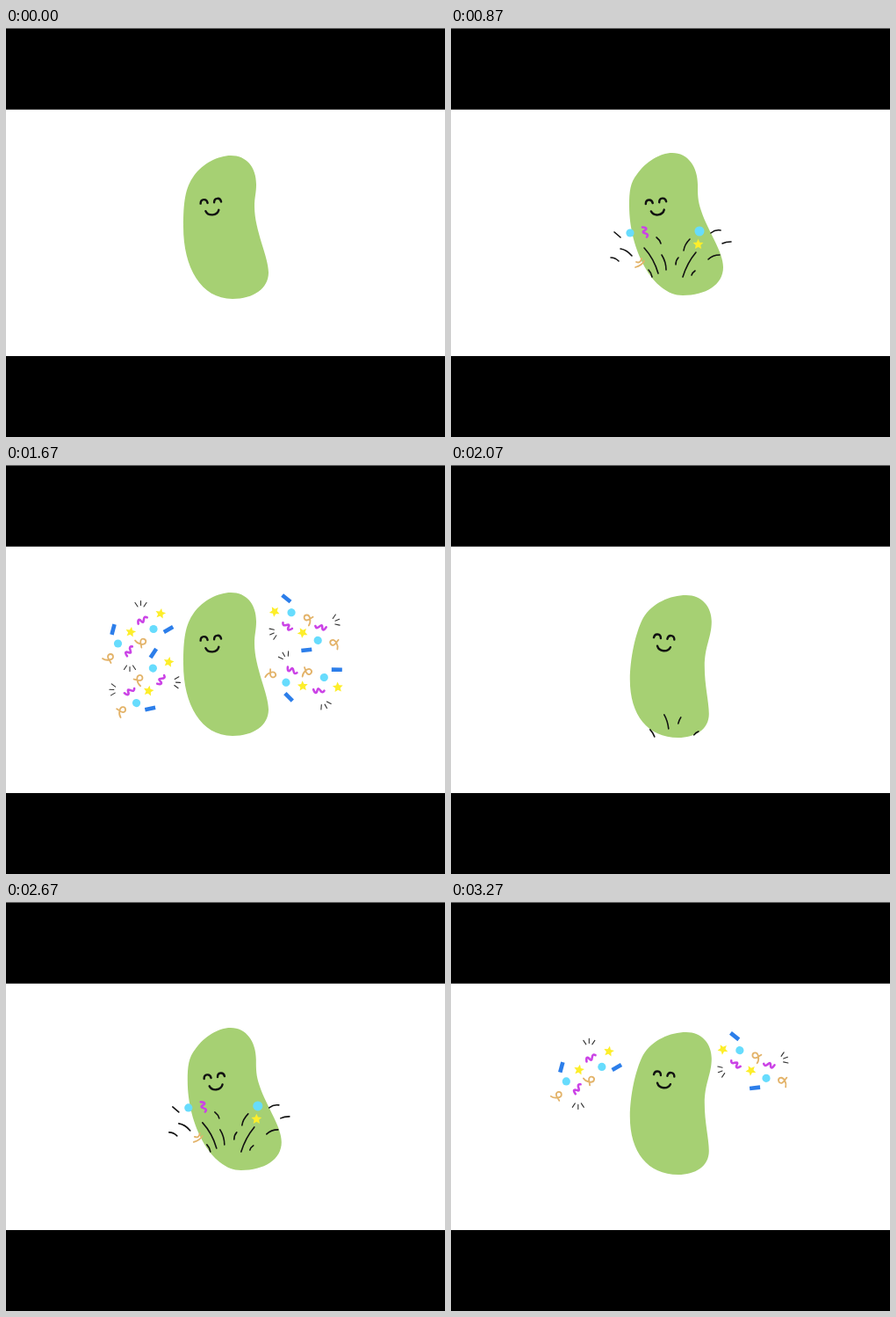
Recreate the animation shown at these times as an HTML page. Size 500 by 465 pixels, loop 3470 ms.

```html
<!DOCTYPE html>
<html lang="en">
<head>
<meta charset="utf-8">
<title>Party bean</title>
<style>
  html, body { margin: 0; width: 100%; height: 100%; overflow: hidden; background: #000; }
  svg { display: block; width: 100vw; height: 100vh; }
  .ink, .squig, .loop, .tick { fill: none; stroke: #111; stroke-linecap: round; stroke-linejoin: round; }
  .ink { stroke-width: 1.6; }
  .face { stroke-width: 2.4; }
  .tick { stroke: #333; stroke-width: 1.1; }
  .squig { stroke: #cb43e6; stroke-width: 2.6; }
  .loop { stroke: #e3b369; stroke-width: 1.8; }
  .dot { fill: #67dcfd; }
  .star { fill: #fdee2a; }
  .bar { fill: #2c7eea; }
  .bean { fill: #a6d073; }
</style>
</head>
<body>
<svg viewBox="0 0 500 465" preserveAspectRatio="none">
  <rect width="500" height="465"/>
  <rect width="500" height="1" fill="#666"/>
  <rect y="92" width="500" height="1" fill="#444"/>
  <rect y="93" width="500" height="280" fill="#fff"/>
  <g id="scene"></g>
</svg>
<script>
const scene = document.getElementById('scene');

const path = (cls, d) => `<path class="${cls}" d="${d}"/>`;
const at = (x, y, turn, body, scale = '1') =>
  `<g transform="translate(${x} ${y}) rotate(${turn}) scale(${scale})">${body}</g>`;

const starPath = 'M' + Array.from({ length: 10 }, (_, i) => {
  const r = i % 2 ? 2.9 : 6.2, a = i * Math.PI / 5 - Math.PI / 2;
  return (r * Math.cos(a)).toFixed(2) + ' ' + (r * Math.sin(a)).toFixed(2);
}).join('L') + 'Z';

const piece = {
  dot: '<circle class="dot" r="4.6"/>',
  star: path('star', starPath),
  bar: '<rect class="bar" x="-6" y="-2.3" width="12" height="4.6"/>',
  squig: path('squig', 'M-6 2C-5 -3 -3 -3 -2 0S0 3 1.5 0S4.5 -3 6 -1'),
  loop: path('loop', 'M-7 1C-3 4 5 3 5 -1C5 -5 -1 -5 -1 -1C-1 1 1 3 2.5 6'),
  tick: path('tick', 'M-6.5 -1.5L-3.5 3M0 -3.5L0 1.5M6.5 -1.5L3.5 3')
};

// One cluster, measured from its centre; the others are turned or mirrored copies.
const cluster = [
  ['tick', 0.5, -29, 0], ['tick', -12, 44, 180],
  ['star', 23, -18, 10], ['star', -11, 3, 10],
  ['dot', 15, -0.5, 0], ['dot', -25.5, 16, 0],
  ['bar', 32, 0, -30], ['bar', -31, 0, -75],
  ['squig', 2.5, -10.5, -22], ['squig', -12.5, 24.5, -48],
  ['loop', 1, 14, 20], ['loop', -36, 32, 0]
];
const burst = (x, y, turn, flip = 1, spread = 1) => at(x, y, turn,
  cluster.map(([kind, px, py, a]) => at(px * spread, py * spread, a, piece[kind])).join(''),
  `${flip} 1`);

const face = (x, y, turn) => at(x, y, turn, path('ink face',
  'M-12.5 -10.5C-12 -16 -5 -16 -4.5 -10.5M3 -10.5C3.5 -16 10.5 -16 11 -10.5' +
  'M-7.5 -1.5C-5 5 5 5 7.5 -1.5'));

const bean = (d, ...mood) => path('bean', d) + face(...mood);

const layers = {
  rest: bean('M256 145C274 145 285 158 285 178C285 188 283 192 283 203C283 230 299 260 299 278' +
    'C299 296 282 308 258 308C222 308 202 272 202 226C202 198 204 182 214 168C224 154 242 145 256 145Z',
    235, 209, -5),
  tall: bean('M264 147C282 147 293 160 293 177C293 195 285 205 285 228C285 250 290 268 290 282' +
    'C290 300 274 309 255 309C220 309 200 283 200 243C200 220 206 190 215 173C225 156 246 147 264 147Z',
    238.5, 207, 6),
  lean: bean('M252 142C270 142 281 158 281 178C281 190 281 196 285 208C293 232 310 254 310 272' +
    'C310 292 290 304 264 304C230 304 203 252 203 202C203 186 204 176 212 166C222 152 238 142 252 142Z',
    235.5, 209, -7),
  spark: path('ink', 'M239 283Q243 290 244 299M258 286Q256 289 255 293' +
    'M223 300Q226 303 228 308M273 306Q275 303 278 302'),
  rays: path('ink', 'M228 263Q237 275 241 288M244 274Q247 280 247 287M270 272Q263 281 260 292' +
    'M262 274Q259 277 258 282M214 288Q217 291 218 295M282 290Q285 286 289 285'),
  spray: at(204, 233, 0, piece.dot) + at(283, 231, 0, piece.dot, '1.2') +
    at(281.5, 246, 0, piece.star) + at(221, 232, 80, piece.squig) +
    path('loop', 'M210 272Q217 270 220 265M211 266Q216 268 217 262') +
    path('ink', 'M220 250Q231 262 236 279M240 258Q245 266 245 275M234 238Q238 241 239 245' +
      'M272 240Q266 246 265 253M259 261Q256 264 256 269M279 255Q269 267 264 283M278 276Q275 278 274 281' +
      'M225 275Q228 278 229 283M186 232L193 238M193 251Q200 252 206 259M182 261Q187 261 191 265' +
      'M296 233Q301 229 307 230M309 245Q313 243 319 243M293 263Q298 258 306 258'),
  flight: burst(187, 211, 0, 1, 0.62) + burst(310, 207, -111.4, 1, 0.62),
  upper: burst(153, 187, 0) + burst(331, 181.5, -111.4),
  lower: burst(166, 246, 93.3, -1) + burst(349, 248.5, 150.3, -1)
};

scene.innerHTML = Object.entries(layers).map(([id, body]) => `<g id="${id}">${body}</g>`).join('');

// start ms, visible layers, second-round offset
const steps = [
  [0, 'rest', 0],
  [270, 'tall spark', 0],
  [470, 'rest rays', 0],
  [870, 'lean spray', 0],
  [1070, 'rest flight', 0],
  [1270, 'tall upper', 0],
  [1670, 'rest upper lower', 0],
  [1870, 'rest', 1],
  [2070, 'tall spark', 1],
  [2470, 'rest rays', 1],
  [2670, 'lean spray', 1],
  [2870, 'rest flight', 1],
  [3270, 'tall upper', 1]
];
const LOOP = 3470;
const start = performance.now();
let shown;

function draw(now) {
  const t = Math.max(0, now - start) % LOOP;
  const step = steps.findLast(s => s[0] <= t);
  if (step !== shown) {
    shown = step;
    const visible = step[1].split(' ');
    for (const g of scene.children) g.style.display = visible.includes(g.id) ? '' : 'none';
    scene.setAttribute('transform', step[2] ? 'translate(3.8 .9)' : '');
  }
  requestAnimationFrame(draw);
}
draw(start);
</script>
</body>
</html>
```
